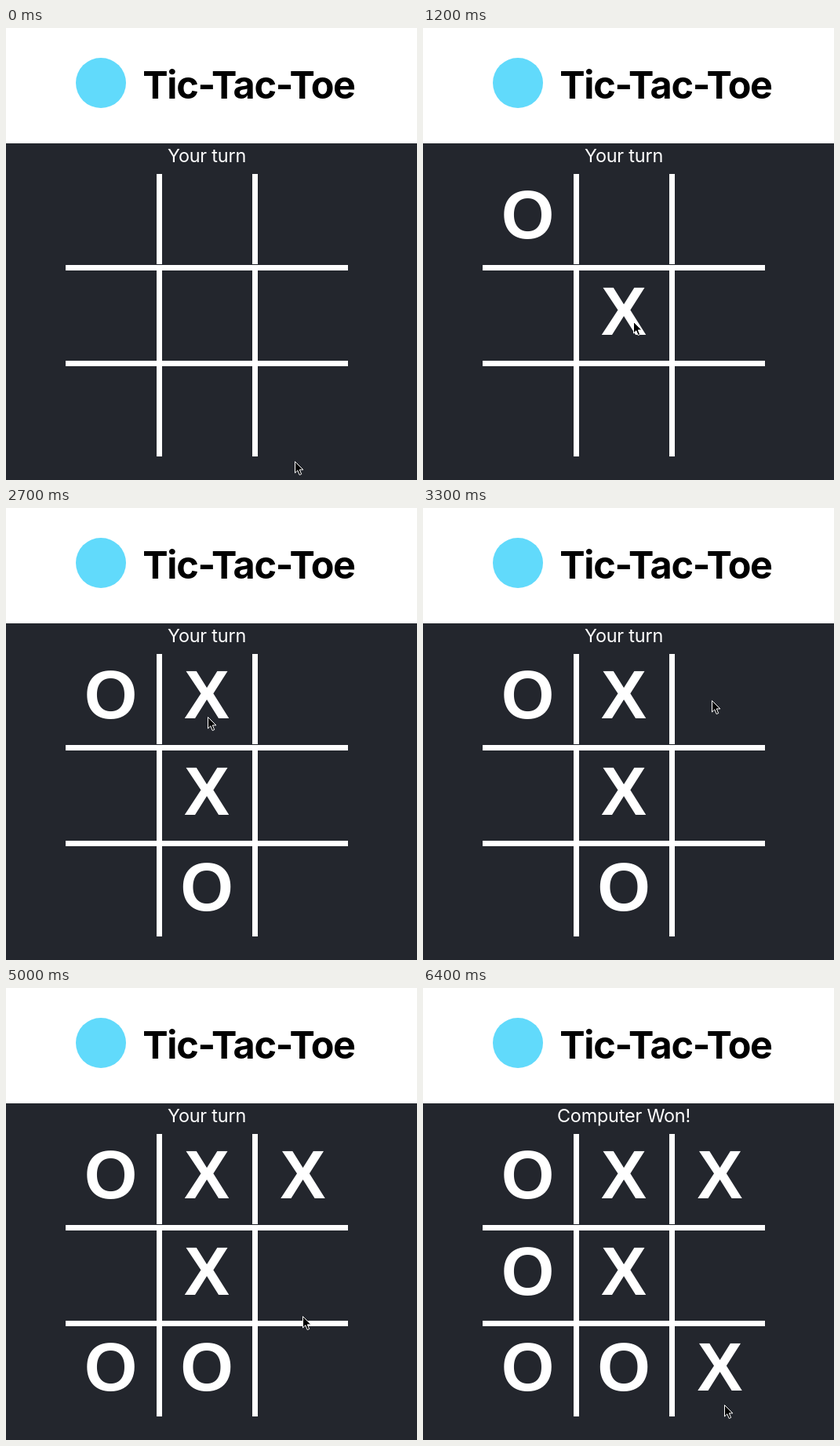
Recreate the animation shown at these times as an HTML page. Size 524 px wide and 576 px high, loop 6.5 s.

```html
<!DOCTYPE html>
<html lang="en">
<head>
<meta charset="utf-8">
<title>Tic-Tac-Toe</title>
<style>
  html, body { margin: 0; width: 100%; height: 100%; overflow: hidden; background: #23262d; }
  svg { display: block; width: 100%; height: 100%; }
  text { font-family: Inter, sans-serif; text-anchor: middle; }
  .title { font-size: 48.5px; font-weight: 700; letter-spacing: -1.3px; }
  .status { font-size: 23.4px; letter-spacing: -.2px; fill: #fff; }
  .mark { font: 700 87px "Liberation Sans", Arial, sans-serif; fill: #fff; }
</style>
</head>
<body>
<svg viewBox="0 0 524 576">
  <rect width="524" height="576" fill="#23262d"/>
  <rect width="524" height="147" fill="#fff"/>
  <circle cx="121" cy="70" r="32" fill="#61dafb"/>
  <text class="title" x="309.5" y="90">Tic-Tac-Toe</text>
  <text class="status" id="status" x="256" y="171"></text>
  <path stroke="#fff" stroke-width="7" d="M195.5 186V546M317.5 186V546M76 305.5H436M76 427.5H436"/>
  <path stroke="#23262d" d="M192 301.5H321"/>
  <g id="marks"></g>
  <path id="cursor" d="M.5.5V15l3.3-3.2 2.4 5.7 2.5-1-2.4-5.6h4.6z" fill="#000" stroke="#fff" stroke-linejoin="round"/>
</svg>
<script>
const LOOP = 6500, STEP = 100;
const FIRST_TURN = 900, TURN = 1450, GLIDE = 350;
const $ = id => document.getElementById(id);

// Cells in the order they are filled; X and O alternate, O answers at once.
const played = [4, 0, 1, 7, 2, 6, 8, 3];

const marks = played.map((cell, i) => {
  const el = document.createElementNS("http://www.w3.org/2000/svg", "text");
  el.setAttribute("class", "mark");
  el.setAttribute("x", 133.5 + 122.5 * (cell % 3));
  el.setAttribute("y", 268 + 122.5 * Math.floor(cell / 3));
  el.textContent = "XO"[i % 2];
  $("marks").append(el);
  return { el, at: FIRST_TURN + TURN * Math.floor(i / 2) };
});
const wonAt = marks[marks.length - 1].at;

// Where the pointer rests, and when it arrives there
const stops = [
  { at: 0, x: 368, y: 552 },
  { at: 750, x: 262, y: 373 },
  { at: 1450, x: 293, y: 377 },
  { at: 2100, x: 257, y: 266 },
  { at: 3250, x: 368, y: 245 },
  { at: 5150, x: 384, y: 531 }
];

const clamp = k => Math.min(1, Math.max(0, k));
const smooth = k => k * k * (3 - 2 * k);

function pointer(t) {
  let { x, y } = stops[0];
  for (const stop of stops) {
    const k = smooth(clamp((t - stop.at) / GLIDE + 1));
    x += (stop.x - x) * k;
    y += (stop.y - y) * k;
  }
  return [Math.round(x), Math.round(y)];
}

function draw(t) {
  for (const { at, el } of marks) el.style.display = t >= at ? "" : "none";
  $("status").textContent = t >= wonAt ? "Computer Won!" : "Your turn";
  $("cursor").setAttribute("transform", `translate(${pointer(t)})`);
}

const start = performance.now();
function tick() {
  const t = (performance.now() - start) % LOOP;
  draw(Math.floor(t / STEP) * STEP);
  requestAnimationFrame(tick);
}
tick();
</script>
</body>
</html>
```
